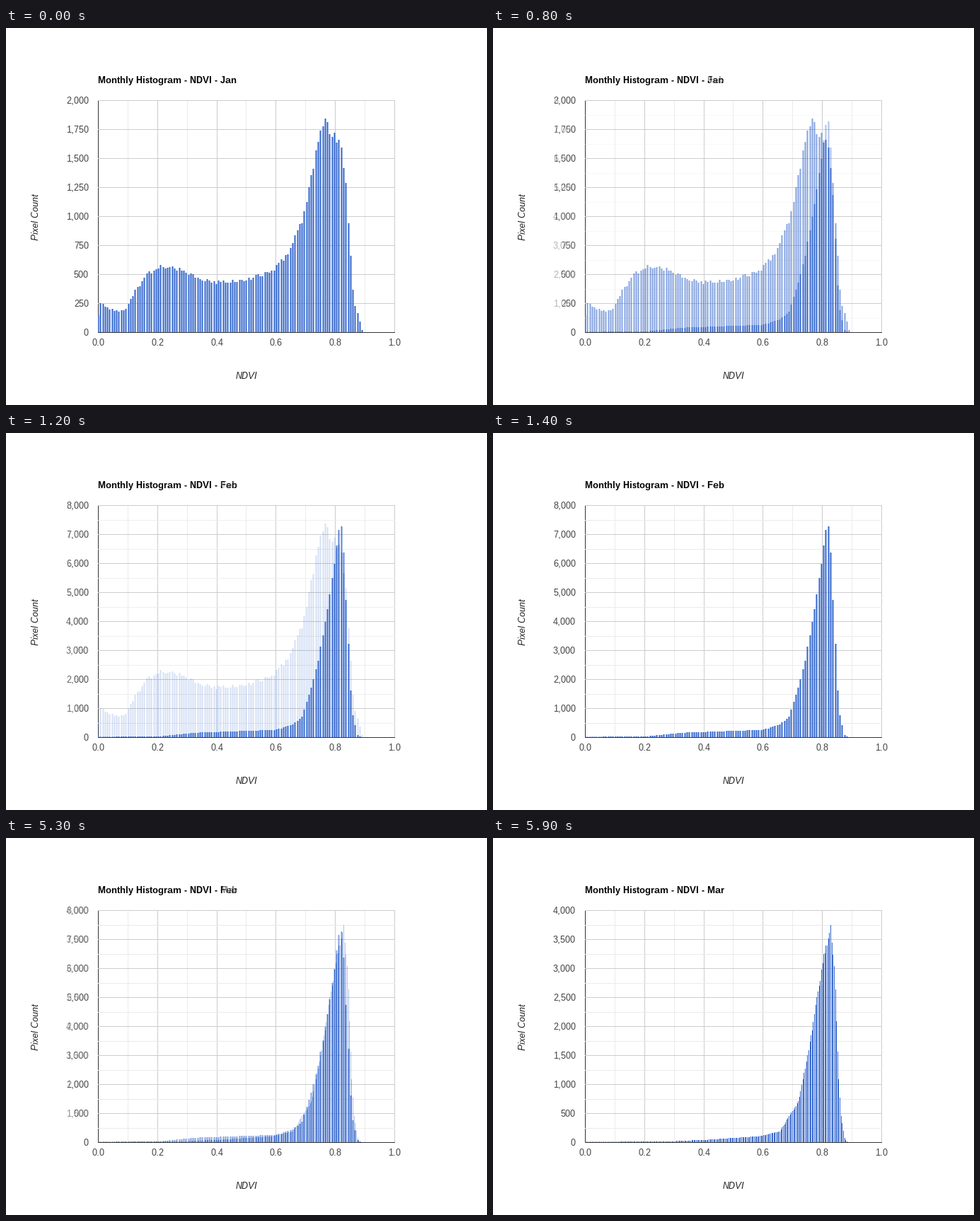
Animation of 680x533 px, one loop 8000 ms. Source, as a matplotlib script:

```python
import math

import matplotlib.pyplot as plt
import numpy as np
from matplotlib.animation import FuncAnimation
from matplotlib.patches import Rectangle

W, H, DPI = 680, 533, 100
LEFT, RIGHT, TOP, BASE = 130, 549, 102, 430
ROW_STEP = 41
BLUE, MAJOR, MINOR, AXIS = "#3366cc", "#cccccc", "#ebebeb", "#333333"
STEP_MS, N_FRAMES, FADE_STEPS = 100, 80, 10
FADE_STARTS = (5, 50)


def histogram(turning_points, wobble, seed):
    """Straight runs between (bin, count) points, roughened by seeded noise."""
    bins, counts = zip(*turning_points)
    curve = np.interp(np.arange(bins[-1] + 1), bins, counts)
    return curve * (1 + np.random.default_rng(seed).uniform(-wobble, wobble, curve.size))


JAN = histogram([(0, 140), (1, 250), (5, 200), (9, 175), (12, 200), (16, 350),
                 (22, 515), (28, 565), (36, 530), (48, 430), (62, 435), (75, 530),
                 (82, 680), (88, 970), (96, 1740), (99, 1800), (105, 1590),
                 (107, 1262), (110, 372), (111, 228), (114, 20)], 0.04, 4)
FEB = histogram([(0, 5), (27, 30), (41, 150), (77, 255), (84, 430), (88, 720),
                 (92, 1690), (95, 2650), (100, 4890), (104, 7170), (105, 7270),
                 (106, 6350), (109, 1620), (110, 760), (112, 80), (113, 25)], 0.01, 5)
MAR = histogram([(0, 3), (68, 10), (104, 40), (150, 100), (168, 185), (184, 700),
                 (191, 1380), (198, 2200), (206, 3200), (212, 3700), (215, 2980),
                 (216, 2590), (219, 1080), (221, 450), (224, 70), (226, 10)], 0.02, 6)

# Name, counts, bins per unit of NDVI, top of the count axis, minor rows shown
MONTHS = [
    ("Jan", JAN, 128, 2000, False),
    ("Feb", FEB, 128, 8000, True),
    ("Mar", MAR, 256, 4000, True),
]

plt.rcParams.update({
    "font.family": "Liberation Sans",
    "text.hinting": "native",
    "text.hinting_factor": 1,
})
fig = plt.figure(figsize=(W / DPI, H / DPI), dpi=DPI, facecolor="white")
ax = fig.add_axes([0, 0, 1, 1])


def reset_stage():
    ax.cla()
    ax.set_xlim(0, W)
    ax.set_ylim(H, 0)
    ax.axis("off")


def rect(x0, y0, x1, y1, color):
    ax.add_patch(Rectangle((x0, y0), x1 - x0, y1 - y0, facecolor=color,
                           linewidth=0, snap=False))


def hline(y, color):
    rect(LEFT, y, RIGHT + 1, y + 1, color)


def vline(x, color):
    rect(x, TOP, x + 1, BASE + 1, color)


def label(x, y, text, color="#444444", ha="center", **style):
    ax.text(x, y, text, color=color, fontsize=13 * 72 / DPI, ha=ha,
            va="baseline", rotation_mode="anchor", **style)


def x_pixel(ndvi):
    # Halves go down to the pixel on the left.
    return math.floor(LEFT + (RIGHT - LEFT) * ndvi + 0.49)


def draw_grid(minor_rows):
    for i in range(5):
        vline(x_pixel(0.1 + 0.2 * i), MINOR)
    for i in range(6):
        vline(x_pixel(0.2 * i), MAJOR)
    vline(LEFT, AXIS)
    if minor_rows:
        for y in range(TOP + ROW_STEP // 2 + 1, BASE, ROW_STEP):
            hline(y, MINOR)
    for y in range(TOP, BASE, ROW_STEP):
        hline(y, MAJOR)


def draw_bars(counts, bins, top_count):
    half_width = 128 / bins
    for k, count in enumerate(counts):
        center = x_pixel(k / bins) + 0.5
        height = max(round((BASE - TOP) * count / top_count), 0.5)
        rect(max(LEFT, center - half_width), BASE - height,
             center + half_width, BASE, BLUE)
    hline(BASE, AXIS)


def draw_labels(month, top_count):
    for i in range(9):
        label(117, BASE - ROW_STEP * i + 5, f"{top_count * i // 8:,}", ha="right")
    for i in range(6):
        label(x_pixel(0.2 * i) + 0.5, 449, f"{0.2 * i:.1f}")
    label(LEFT, 78, f"Monthly Histogram - NDVI - {month}", "black",
          ha="left", weight="bold")
    label(340, 496, "NDVI", "#222222", style="italic")
    label(46, 266.5, "Pixel Count", "#222222", style="italic", rotation=90)


def render(month, counts, bins, top_count, minor_rows):
    reset_stage()
    draw_grid(minor_rows)
    draw_bars(counts, bins, top_count)
    draw_labels(month, top_count)
    fig.canvas.draw()
    return np.asarray(fig.canvas.buffer_rgba())[..., :3].astype(float)


stills = [render(*chart) for chart in MONTHS]
reset_stage()
picture = ax.imshow(stills[0].astype(np.uint8), extent=(0, W, H, 0),
                    aspect="auto", interpolation="nearest")


def update(frame):
    # Each month dissolves linearly into the next one.
    image = stills[0]
    for start, still in zip(FADE_STARTS, stills[1:]):
        mix = np.clip((frame - start + 1) / FADE_STEPS, 0, 1)
        image = image * (1 - mix) + still * mix
    picture.set_data(np.rint(image).astype(np.uint8))
    return [picture]


anim = FuncAnimation(fig, update, frames=N_FRAMES, interval=STEP_MS,
                     repeat=True, repeat_delay=0, blit=False)
plt.show()
```
